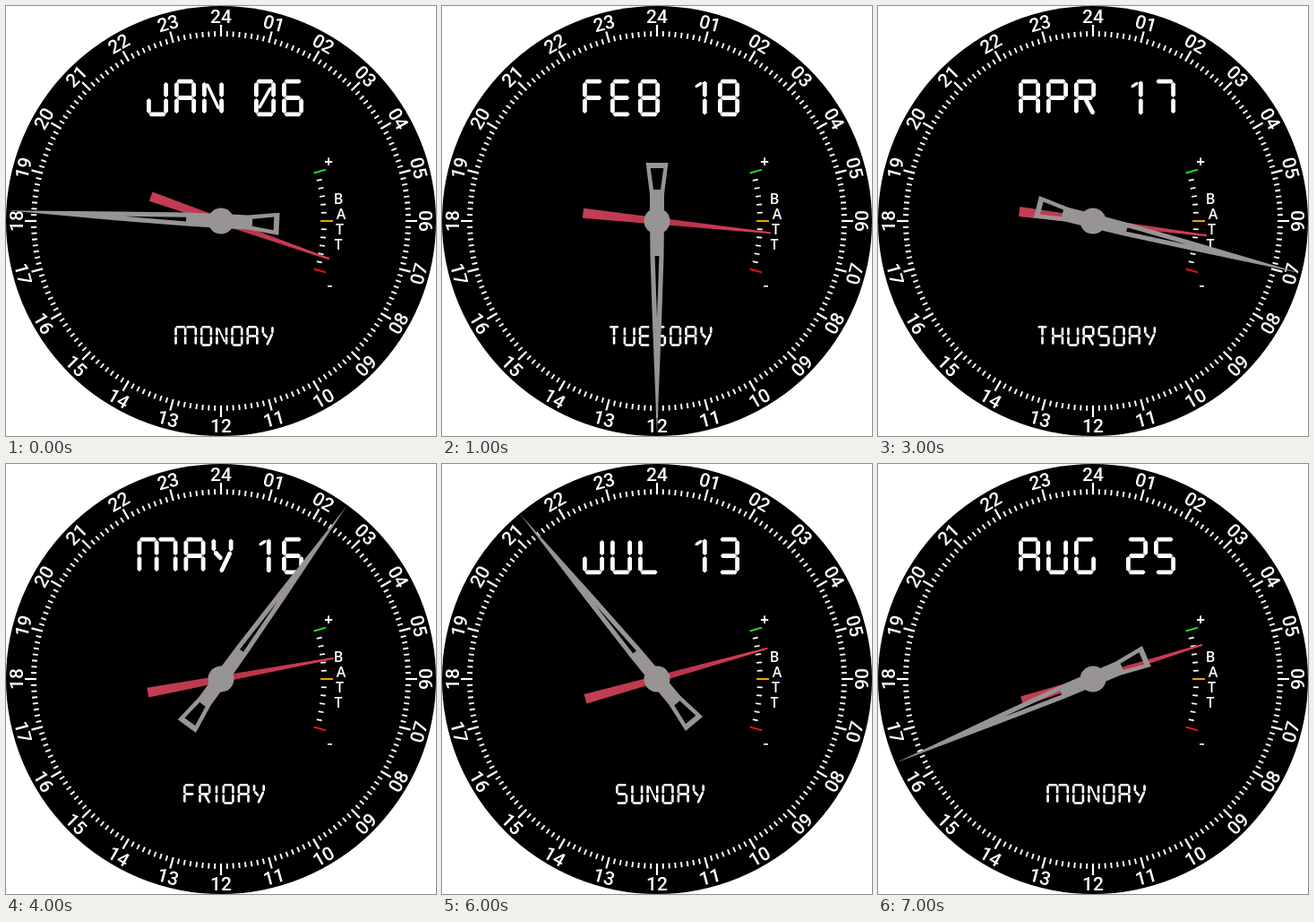
Animation, 480 px wide and 480 px high, one loop 8 s. Source, as an HTML page with a canvas:

```html
<!DOCTYPE html>
<html lang="en">
<head>
<meta charset="utf-8">
<title>24-hour watch dial</title>
<style>
html, body { margin: 0; width: 100%; height: 100%; overflow: hidden; background: #fff; }
canvas { display: block; width: 480px; height: 480px; }
</style>
</head>
<body>
<canvas id="stage" width="480" height="480"></canvas>
<script>
const ctx = document.getElementById('stage').getContext('2d');
const RAD = Math.PI / 180;
const STEP = 1000;

// Hands: degrees clockwise from three o'clock
const scenes = [
  { month: 'JAN', date: '06', day: 'MONDAY', hour: 182.8, battery: 19.3 },
  { month: 'FEB', date: '18', day: 'TUESDAY', hour: 90, battery: 6 },
  { month: 'MAR', date: '19', day: 'WEDNESDAY', hour: 115, battery: 1 },
  { month: 'APR', date: '17', day: 'THURSDAY', hour: 14.1, battery: 7.3 },
  { month: 'MAY', date: '16', day: 'FRIDAY', hour: -54, battery: -10.5 },
  { month: 'JUN', date: '28', day: 'SATURDAY', hour: -24.6, battery: -13.9 },
  { month: 'JUL', date: '13', day: 'SUNDAY', hour: 230.3, battery: -15.5 },
  { month: 'AUG', date: '25', day: 'MONDAY', hour: 157, battery: -17.4 }
];

// Segment display on a 24 by 41 cell
const CELL = 24, PITCH = 31, WIDE = 21;
const segments = {
  a: [2, 2.2, 22, 2.2], b: [21.6, 2.5, 21.6, 20.5], c: [21.6, 20.5, 21.6, 38.5],
  d: [2, 38.8, 22, 38.8], e: [2.4, 20.5, 2.4, 38.5], f: [2.4, 2.5, 2.4, 20.5],
  g: [2.5, 20.5, 21.5, 20.5], h: [12, 2.5, 12, 20.5], i: [12, 20.5, 12, 38.5],
  k: [12, 20.5, 22, 39.5], n: [5, 4, 19, 34], z: [5, 33, 19, 8],
  q: [5, 9, 14, 3], r: [16.3, 1, 16.3, 20.5], s: [16.3, 20.5, 16.3, 40],
  u: [2.4, 1, 2.4, 16], v: [2.4, 15, 12, 25], w: [21.6, 1, 21.6, 16], y: [21.6, 15, 10, 39.5]
};
const glyphs = {
  0: 'abcdefz', 1: 'qrs', 2: 'abged', 3: 'abgcd', 5: 'afgcd', 6: 'afgecd', 7: 'abc',
  8: 'abcdefg', 9: 'abcdfg', A: 'abcefg', B: 'abcdefg', D: 'abcdef', E: 'adefg',
  F: 'aefg', G: 'acdef', H: 'bcefg', I: 'ef', J: 'bcde', L: 'def', M: 'abcef',
  N: 'bcefn', O: 'abcdef', P: 'abefg', R: 'abefgk', S: 'afgcd', T: 'ahi',
  U: 'bcdef', W: 'bcdef', Y: 'uvwy'
};
const extraColumn = { M: 'abc', W: 'bcd' };

function glyphWidth(ch) {
  return ch === 'I' ? 9.5 : extraColumn[ch] ? CELL + WIDE : CELL;
}

function polygon(points) {
  ctx.beginPath();
  points.forEach(([x, y]) => ctx.lineTo(x, y));
  ctx.closePath();
}

function segment(key, dx) {
  const [x1, y1, x2, y2] = segments[key];
  const len = Math.hypot(x2 - x1, y2 - y1);
  ctx.save();
  ctx.translate(x1 + dx, y1);
  ctx.rotate(Math.atan2(y2 - y1, x2 - x1));
  const t = 'zqn'.includes(key) ? 1.7 : 2.4;
  polygon([[0.4, 0], [2.4, -t], [len - 2.4, -t], [len - 0.4, 0], [len - 2.4, t], [2.4, t]]);
  ctx.fill();
  ctx.restore();
}

function lcd(text, centre, top, scale) {
  const gap = PITCH - CELL;
  const total = [...text].reduce((sum, ch) => sum + glyphWidth(ch) + gap, -gap);
  ctx.save();
  ctx.translate(centre, top);
  ctx.scale(scale, scale);
  ctx.fillStyle = '#fff';
  let x = -total / 2;
  for (const ch of text) {
    const inset = ch === 'I' ? 2.5 : 0;
    for (const key of glyphs[ch]) segment(key, x + inset);
    for (const key of extraColumn[ch] || '') segment(key, x + WIDE);
    x += glyphWidth(ch) + gap;
  }
  ctx.restore();
}

function tick(cx, angle, inner, outer, width, color) {
  const c = Math.cos(angle), s = Math.sin(angle);
  ctx.beginPath();
  ctx.moveTo(cx + inner * c, 240 + inner * s);
  ctx.lineTo(cx + outer * c, 240 + outer * s);
  ctx.lineWidth = width;
  ctx.strokeStyle = color;
  ctx.stroke();
}

function label(text, x, y, angle = 0) {
  ctx.save();
  ctx.translate(x, y);
  ctx.rotate(angle);
  const box = ctx.measureText(text);
  ctx.fillText(text, 0, (box.actualBoundingBoxAscent - box.actualBoundingBoxDescent) / 2);
  ctx.restore();
}

function dial() {
  ctx.fillStyle = '#fff';
  ctx.fillRect(0, 0, 480, 480);
  ctx.fillStyle = '#000';
  ctx.beginPath();
  ctx.arc(240, 240, 240, 0, 2 * Math.PI);
  ctx.fill();

  const perHour = 8;
  for (let n = 0; n < 24 * perHour; n++) {
    const major = n % perHour === 0;
    tick(240, n * 15 / perHour * RAD, 206, major ? 219 : 212, major ? 2.2 : 1.9, '#fff');
  }
  ctx.fillStyle = '#fff';
  ctx.textAlign = 'center';
  ctx.font = '500 21px Roboto, sans-serif';
  for (let h = 1; h <= 24; h++) {
    const a = h * 15 * RAD;
    const flip = h > 6 && h < 18 ? Math.PI : 0;
    label(String(h).padStart(2, '0'), 240 + 228.5 * Math.sin(a), 240 - 228.5 * Math.cos(a), a + flip);
  }
}

function batteryScale() {
  const cx = 153, span = 15.7 * RAD, steps = 6;
  for (let n = 1; n < steps; n++) {
    for (const side of [-1, 1]) tick(cx, side * span * n / steps, 199, 205, 1.7, '#fff');
  }
  tick(cx, -span, 198, 212, 2, '#20e020');
  tick(cx, 0, 198, 212, 2, '#f0a010');
  tick(cx, span, 198, 212, 2, '#f01020');
  ctx.fillStyle = '#fff';
  ctx.font = '600 16px "Open Sans", sans-serif';
  label('B', 371, 215);
  label('A', 374, 232);
  label('T', 372.5, 249);
  label('T', 371, 266);
  ctx.font = '700 17px "Open Sans", sans-serif';
  label('+', 360, 173);
  ctx.fillRect(359, 312, 5, 1.6);
}

function pivot(angle, draw) {
  ctx.save();
  ctx.translate(240, 240);
  ctx.rotate(angle * RAD);
  draw();
  ctx.restore();
}

function batteryHand() {
  const paint = ctx.createLinearGradient(-83, 0, 128, 0);
  paint.addColorStop(0, '#c43f55');
  paint.addColorStop(0.5, '#b8344a');
  paint.addColorStop(1, '#d83e54');
  ctx.fillStyle = paint;
  polygon([[-83, -5.5], [128, -1], [128, 1], [-83, 5.5]]);
  ctx.fill();
}

function hourHand() {
  ctx.fillStyle = '#989494';
  ctx.filter = 'blur(0.6px)';
  ctx.beginPath();
  const outline = [[239, 0], [115, -5], [39, -7.5], [0, -8], [-30, -8], [-65, -12.5],
    [-65, 12.5], [-30, 8], [0, 8], [39, 7.5], [115, 5]];
  const slit = [[39, -2.4], [108, 0], [39, 2.4]];
  const opening = [[-35, -4], [-59, -7.3], [-59, 7.3], [-35, 4]];
  for (const shape of [outline, slit, opening]) {
    shape.forEach(([x, y], i) => i ? ctx.lineTo(x, y) : ctx.moveTo(x, y));
    ctx.closePath();
  }
  ctx.fill('evenodd');
  ctx.beginPath();
  ctx.arc(0, 0, 14.5, 0, 2 * Math.PI);
  ctx.fill();
}

function render(time) {
  const scene = scenes[Math.floor(time / STEP) % scenes.length];
  dial();
  batteryScale();
  lcd(scene.month, 200, 82, 1);
  lcd(scene.date, 304.5, 82, 1);
  lcd(scene.day, 243.5, 357, 0.553);
  pivot(scene.battery, batteryHand);
  pivot(scene.hour, hourHand);
}

let start;
function loop(now) {
  start ??= now;
  render(now - start);
  requestAnimationFrame(loop);
}
render(0);
requestAnimationFrame(loop);
</script>
</body>
</html>
```
